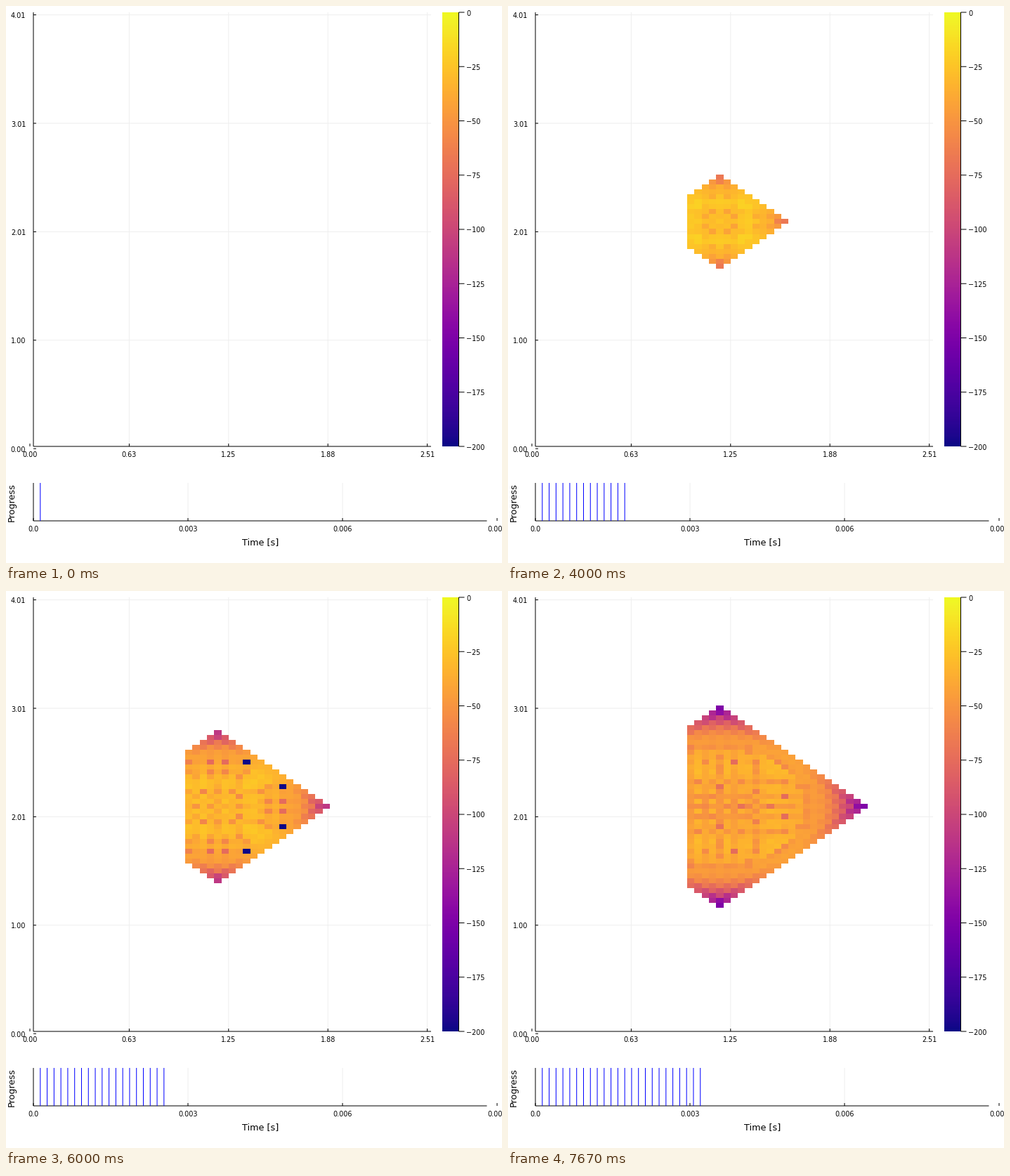
A matplotlib script that plays this animation: 706x793 px, repeating every 8000 ms.

```python
import numpy as np
import matplotlib.pyplot as plt
from matplotlib.animation import FuncAnimation

W, H, DPI = 706, 793, 100
PX = 72 / DPI                      # points per pixel
STEPS, LOOP_MS, FRAMES = 24, 8000, 160
INTERVAL = LOOP_MS // FRAMES
COLS, ROWS = 55, 88
SRC_COL, SRC_ROW, WALL_COL = 25, 42, 21
LIFT = 4                           # source height above the shown slice
DEPTH = 60
LEFT, RIGHT, TOP, BOTTOM = 39.0, 605.0, 9.0, 627.0
HEAT_EXTENT = (39.4, 604.8, 627.5, 8.9)
BAR_TOP, BAR_BOTTOM = 679, 733

plt.rcParams["font.family"] = "DejaVu Sans"


def neighbour_sum(p):
    total = np.zeros_like(p)
    for axis in range(3):
        a, t = np.moveaxis(p, axis, 0), np.moveaxis(total, axis, 0)
        t[1:] += a[:-1]
        t[:-1] += a[1:]
    return total


def simulate(steps):
    """Levels in dB on one slice of a 3D wave mesh, one array per step."""
    pulse = {0: 1.0, 1: 1.0}
    first = WALL_COL - 1           # hidden column that absorbs the wave
    source = (SRC_ROW, SRC_COL - first, DEPTH // 2 + LIFT)
    rows, cols = np.mgrid[:ROWS, :COLS]
    reach = abs(rows - SRC_ROW) + abs(cols - SRC_COL) + LIFT
    before = np.zeros((ROWS, COLS - first, DEPTH))
    now = np.zeros_like(before)
    levels = []
    for n in range(steps + 1):
        after = neighbour_sum(now) / 3 - before
        after[:, 0] = now[:, 1]
        after[source] += pulse.get(n, 0) - pulse.get(n - 2, 0)
        before, now = now, after
        level = np.full((ROWS, COLS), np.nan)
        amplitude = np.maximum(abs(now[:, 1:, DEPTH // 2]), 1e-10)
        level[:, WALL_COL:] = 20 * np.log10(amplitude)
        level[reach > n] = np.nan
        levels.append(np.ma.masked_invalid(level))
    return levels


levels = simulate(STEPS)

fig = plt.figure(figsize=(W / DPI, H / DPI), dpi=DPI, facecolor="white")
ax = fig.add_axes([0, 0, 1, 1])
ax.axis("off")


def line(x0, y0, x1, y1, color="black", z=4):
    return ax.plot([x0, x1], [y0, y1], color=color, lw=PX, zorder=z,
                   solid_capstyle="butt", snap=False)[0]


def label(x, y, text, size=9.6, ha="center", va="center_baseline", **kw):
    ax.text(x, y, text, fontsize=size * PX, ha=ha, va=va, **kw)


GRID = "#efefef"

# Main plot
for i, text in enumerate(["0.00", "0.63", "1.25", "1.88", "2.51"]):
    x = 34 + 141.4 * i
    if i:
        line(x, TOP, x, BOTTOM, GRID, 1)
    line(x, BOTTOM, x, BOTTOM - 4)
    label(x, 638.5, text)
for i, text in enumerate(["0.00", "1.00", "2.01", "3.01", "4.01"]):
    y = 630.2 - 154.4 * i
    if i:
        line(LEFT, y, RIGHT, y, GRID, 1)
    line(LEFT, y, LEFT + 4, y)
    label(28.2, y + 0.5, text, ha="right")
line(LEFT, TOP, LEFT, BOTTOM)
line(LEFT, BOTTOM, RIGHT, BOTTOM)

# Colour bar
ax.imshow(np.linspace(1, 0, 256)[:, None], cmap="plasma", aspect="auto",
          extent=(620.5, 644.5, BOTTOM, TOP), zorder=2)
line(644.5, TOP, 644.5, BOTTOM)
for value in range(0, -201, -25):
    y = TOP - value / 200 * (BOTTOM - TOP)
    line(644.5, y, 652.5, y)
    label(655.5, y + 0.5, str(value).replace("-", "\u2212"), ha="left")

# Progress plot
for i, text in enumerate(["0.0", "0.003", "0.006", "0.009"]):
    x = LEFT + 220 * i
    if 0 < i < 3:
        line(x, BAR_TOP, x, BAR_BOTTOM, GRID, 1)
    line(x, BAR_BOTTOM, x, BAR_BOTTOM - 4)
    label(x, 744.5, text)
line(LEFT, BAR_TOP, LEFT, BAR_BOTTOM)
line(LEFT, BAR_BOTTOM, 684.5, BAR_BOTTOM)
label(362, 761.7, "Time [s]", 12.8)
label(8.5, 706.8, "Progress", 12.8, va="center", rotation=90)

heat = ax.imshow(levels[0], cmap="plasma", vmin=-200, vmax=0, aspect="auto",
                 interpolation="nearest", extent=HEAT_EXTENT, zorder=3)
marks = [line(x, BAR_TOP, x, BAR_BOTTOM, "blue", 5)
         for x in 48.8 + 9.78 * np.arange(STEPS)]
ax.set_xlim(0, W)
ax.set_ylim(H, 0)


def update(frame):
    # The step in force when this frame ends
    step = ((frame + 1) * INTERVAL - 1) * STEPS // LOOP_MS
    heat.set_data(levels[step + 1])
    for i, mark in enumerate(marks):
        mark.set_visible(i <= step)
    return [heat, *marks]


anim = FuncAnimation(fig, update, frames=FRAMES, interval=INTERVAL,
                     repeat=True, repeat_delay=0, blit=False)
plt.show()
```
